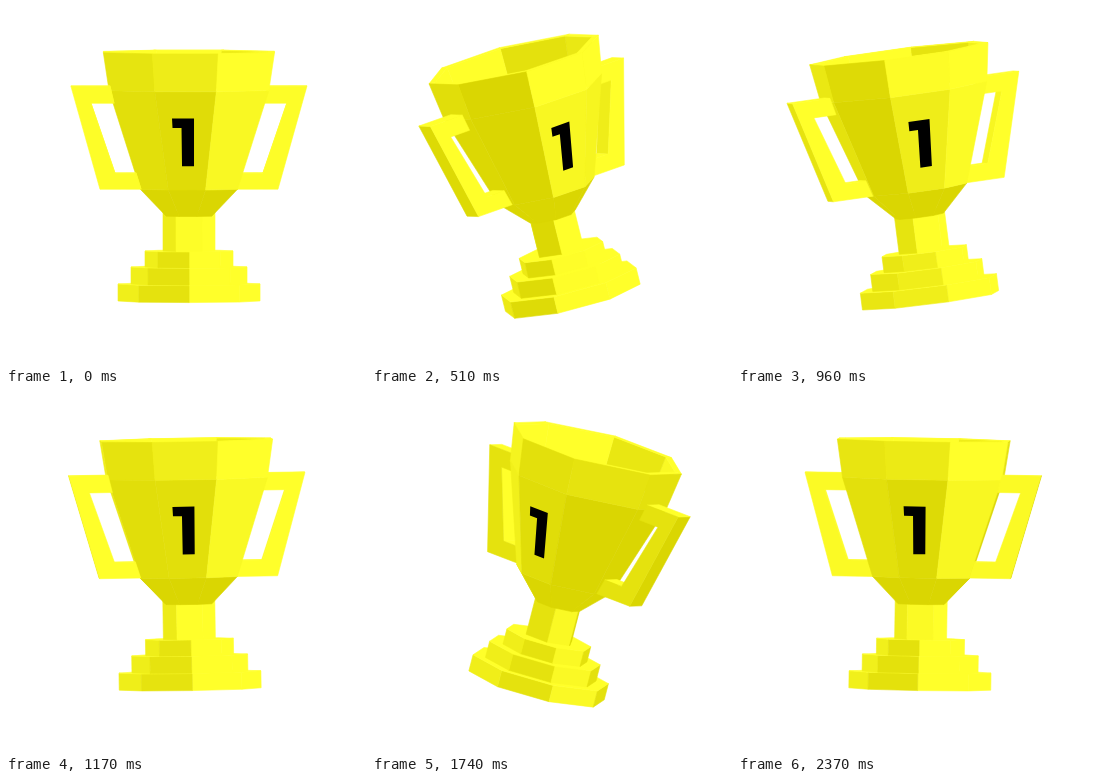
These frames come from a looping animation (360 px wide and 360 px high, 2.4 s). An HTML page with a canvas:

```html
<!DOCTYPE html>
<html lang="en">
<head>
<meta charset="utf-8">
<title>Trophy</title>
<style>
html, body { margin: 0; width: 100%; height: 100%; overflow: hidden; background: #fff; }
canvas { display: block; }
</style>
</head>
<body>
<canvas id="stage" width="360" height="360"></canvas>
<script>
const ctx = document.getElementById('stage').getContext('2d');
const LOOP = 2400, RAD = Math.PI / 180;
const YAW = 37 * RAD, ROLL = 19 * RAD, PITCH = 1.3 * RAD;

// Model space: x right, y down, z towards the viewer, origin on the cup's axis.
// Faces run clockwise as seen from outside.
const ring = (r, y, angles) =>
  angles.map(a => [r * Math.sin(a * RAD), y, r * Math.cos(a * RAD)]);

const band = (top, bottom) => top.map((p, i) => {
  const j = (i + 1) % top.length;
  return [p, top[j], bottom[j], bottom[i]];
});

const prism = (r, y0, y1, angles) => {
  const top = ring(r, y0, angles);
  return [...band(top, ring(r, y1, angles)), top.slice().reverse()];
};

const octagon = [0, 45, 90, 135, 180, 225, 270, 315];
const hexagon = [30, 90, 150, 210, 270, 330];
const cupAngles = [-72, -24, 19, 72, 108, 157, 203, 252];

const base = [
  ...prism(71, 58, 75, octagon),
  ...prism(58, 41, 58, octagon),
  ...prism(44, 25, 41, octagon),
  ...prism(26, -14, 25, hexagon)
];

const [rim, neck, waist, foot, lip, inside] =
  [[90, -174], [84, -136], [51, -37], [24, -10], [83, -174], [77, -136]]
    .map(([r, y]) => ring(r, y, cupAngles));

const cup = [
  ...band(inside, lip),
  ...band(lip, rim),
  ...band(waist, foot),
  ...band(neck, waist),
  ...band(rim, neck)
];

const handleShape = [[79, -140], [118, -140], [89, -37], [48, -37],
  [53, -53], [74, -53], [98, -123], [75, -123]];

function makeHandle(side) {
  const shape = handleShape.map(([x, y]) => [x * side, y]);
  if (side < 0) shape.reverse();
  const front = shape.map(p => [...p, 10]);
  const back = shape.map(p => [...p, -12]);
  return { sides: band(back, front), cap: front };
}
const leftHandle = makeHandle(-1), rightHandle = makeHandle(1);

const digit = [[-17, -109], [5, -109], [5, -61], [-7, -61], [-7.5, -99.5], [-16.5, -99.5]]
  .map(([x, y]) => [x, y, 0.92 * (84 - 0.33 * (y + 136))]);

const turn = (a, b, angle) => [
  a * Math.cos(angle) + b * Math.sin(angle),
  b * Math.cos(angle) - a * Math.sin(angle)
];

let swing = 0;

function rotate([x, y, z]) {
  [x, y] = turn(x, y, ROLL * swing);
  [x, z] = turn(x, z, YAW * swing);
  [y, z] = turn(y, z, PITCH);
  return [x, y, z];
}

function normalOf(points) {
  const n = [0, 0, 0];
  points.forEach((p, i) => {
    const q = points[(i + 1) % points.length];
    n[0] += p[1] * q[2] - p[2] * q[1];
    n[1] += p[2] * q[0] - p[0] * q[2];
    n[2] += p[0] * q[1] - p[1] * q[0];
  });
  const length = Math.hypot(...n) || 1;
  return n.map(v => v / length);
}

function shade([x, y, z]) {
  const key = 0.5 * x - 0.6 * y + 0.62 * z;
  const fill = -0.7 * x - 0.7 * y - 0.1 * z;
  const light = Math.min(1, 3.4 * Math.max(0, key - 0.33) + Math.max(0, fill));
  const mix = (a, b) => Math.round(a + (b - a) * light);
  return `rgb(${mix(218, 255)},${mix(214, 255)},${mix(2, 42)})`;
}

function drawFace(face, color) {
  const points = face.map(rotate);
  const normal = normalOf(points);
  if (normal[2] <= 0) return;
  ctx.beginPath();
  points.forEach(([x, y]) => ctx.lineTo(183 + x, 220 + y));
  ctx.closePath();
  ctx.fillStyle = ctx.strokeStyle = color || shade(normal);
  ctx.fill();
  if (!color) ctx.stroke();
}

const depth = face => face.reduce((sum, p) => sum + rotate(p)[2], 0);

function drawHandle({ sides, cap }) {
  sides.slice().sort((a, b) => depth(a) - depth(b)).forEach(f => drawFace(f));
  drawFace(cap);
}

function draw(now) {
  // Triangle wave: upright, left, upright, right.
  swing = Math.asin(Math.sin(2 * Math.PI * now / LOOP)) * 2 / Math.PI;
  ctx.fillStyle = '#fff';
  ctx.fillRect(0, 0, 360, 360);
  ctx.lineWidth = 0.6;
  ctx.lineJoin = 'round';
  const [far, near] = swing > 0 ? [rightHandle, leftHandle] : [leftHandle, rightHandle];
  drawHandle(far);
  base.forEach(f => drawFace(f));
  cup.forEach(f => drawFace(f));
  drawFace(digit, '#000');
  drawHandle(near);
}

function tick() {
  draw(performance.now());
  requestAnimationFrame(tick);
}
tick();
</script>
</body>
</html>
```
